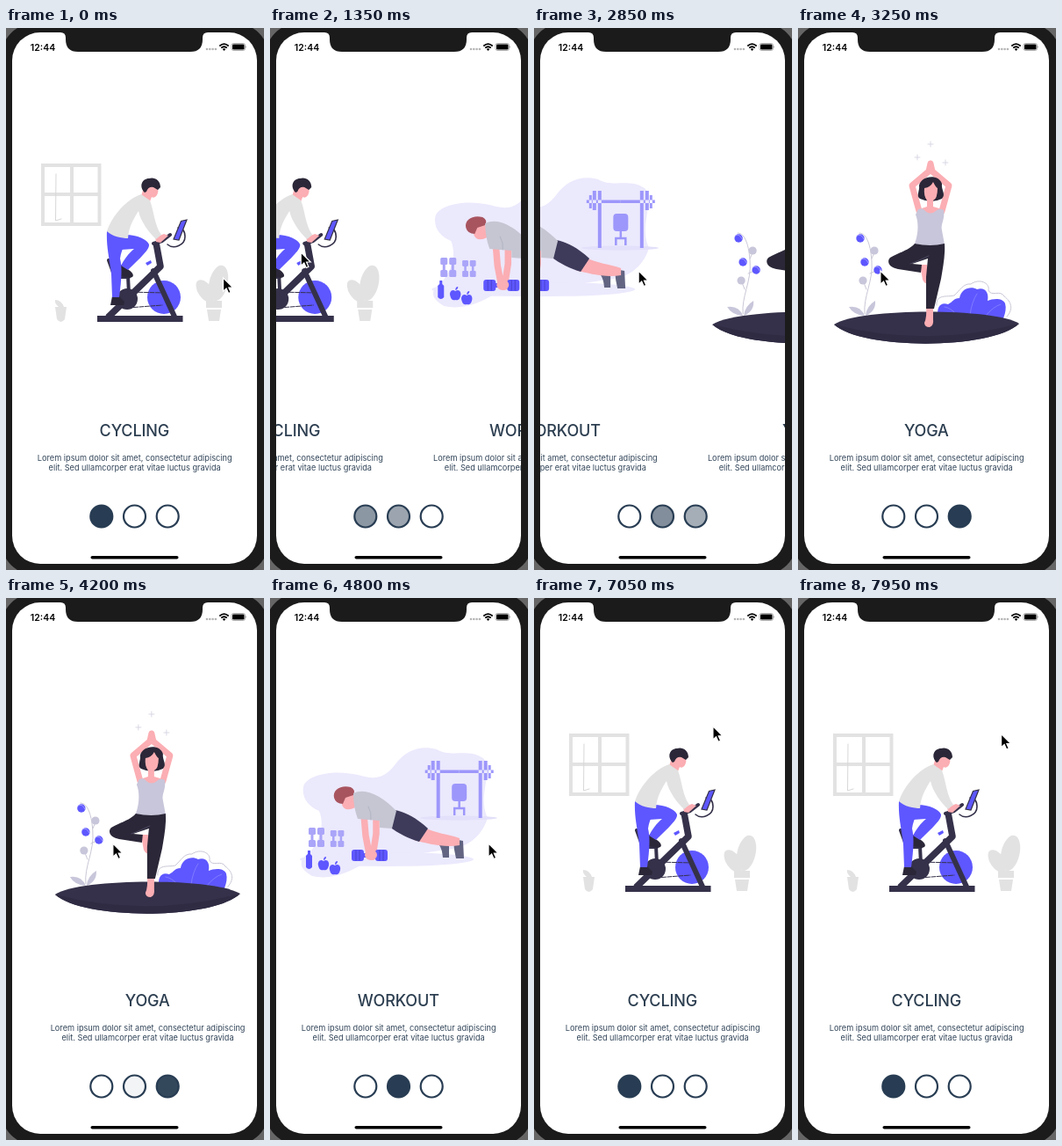
An HTML page that plays this animation: 294x616 px, repeating every 8000 ms.

```html
<!DOCTYPE html>
<html lang="en">
<head>
<meta charset="utf-8">
<title>Fitness onboarding</title>
<style>
  html, body { margin: 0; width: 100%; height: 100%; overflow: hidden; background: #666; }
  svg { display: block; width: 294px; height: 616px; }
  text { font-family: Inter, "Open Sans", sans-serif; fill: #2c3e50; text-anchor: middle; }
  .title { font-size: 18px; font-weight: 500; letter-spacing: -.15px; }
  .body { font-size: 9.2px; fill: #33465a; }
  .clock { font-size: 10.5px; font-weight: 600; fill: #000; }
  .line { fill: none; stroke-linecap: round; stroke-linejoin: round; }
  .gray { fill: #e2e2e2; }
  .dark { fill: #35314a; }
  .ink { fill: #2b2738; }
  .skin { fill: #fbaeb3; }
  .violet { fill: #5e57ff; }
  .lilac { fill: #9d97fb; }
  .pale { fill: #ebe9fc; }
  .mist { fill: #c8c6da; }
</style>
</head>
<body>
<svg viewBox="0 0 294 616">
  <defs>
    <clipPath id="screen"><rect x="7" y="5" width="279" height="604" rx="32"/></clipPath>
    <g id="dumbbell">
      <rect x="1" width="8" height="8" rx="1.5"/>
      <rect x="3.5" y="7" width="3" height="9"/>
      <rect x="1" y="14" width="8" height="8" rx="1.5"/>
    </g>
    <g id="pair"><use href="#dumbbell"/><use href="#dumbbell" x="10"/></g>
    <g id="apple">
      <path d="M0-4C-4-7-7-3-6 1C-5 6-2 7 0 6C2 7 5 6 6 1C7-3 4-7 0-4Z"/>
      <path d="M0-5Q0-9 3-9Q3-6 0-5Z"/>
    </g>
    <path id="rackHalf" d="M0 195.500H-39V199H0ZM-26 185H-22V250H-26ZM-36 190H-33V205H-36ZM-32 185H-28V207H-32Z"/>
    <g id="weight"><rect width="14" height="13" rx="3"/><path class="line" stroke="#4943cc" d="M5 1V12M9 1V12"/></g>
    <path id="sparkle" class="line" stroke="#d5d4e2" stroke-width=".9" d="M-3 0H3M0-3V3"/>
    <g id="berry"><circle r="4.700"/><path class="line" stroke="#b9b5ff" stroke-width=".7" d="M-4-3Q1-6 4 1"/></g>
  </defs>

  <rect x="-6" y="-6" width="306" height="628" rx="40" fill="#1b1b1b"/>
  <rect x="7" y="5" width="279" height="604" rx="32" fill="#fff"/>

  <g clip-path="url(#screen)">
    <g class="page" data-title="CYCLING">
      <path fill="none" stroke="#e2e2e2" stroke-width="4" d="M42 156H106.500V223H42ZM75 156V223M42 189H106"/>
      <path class="line" stroke="#d8d8d8" d="M57 166L56.500 219L63 217"/>
      <g class="gray">
        <path d="M56 317H69L67 331Q62.500 337 58 331ZM56 309Q63 309 66 317H60Q55 313 56 309Z"/>
        <ellipse cx="242" cy="290" rx="10.500" ry="20.500" transform="rotate(13 242 290)"/>
        <ellipse cx="227" cy="299" rx="8" ry="14.500" transform="rotate(-34 227 299)"/>
        <path d="M228 310H246V318H228ZM229 320H245L243 333H231Z"/>
      </g>
      <circle class="violet" cx="180" cy="306" r="19"/>
      <g class="line" stroke="#35314a">
        <path stroke-dasharray="5 1.500" d="M138 300L181 301M139 318L178 315"/>
        <path stroke-width="7.500" stroke-linecap="butt" d="M116 329L176 271L171 244"/>
        <path stroke-width="6" d="M168 276L192 328"/>
        <path stroke-width="4" d="M140 302L139 282M117 264L124 283H140M168 245L178 242L187 235"/>
        <path stroke-width="1.600" d="M184 246C191 252 204 247 204 237C204 230 200 227 196 227"/>
      </g>
      <circle class="dark" cx="138" cy="308" r="12"/>
      <rect class="dark" x="104" y="327" width="97.500" height="7"/>
      <path class="violet" stroke="#35314a" stroke-width="1.200" d="M191 240L199.500 219.500L206 218L197 241Z"/>
      <path class="violet" d="M159 267L165 264L166 267L161 270Z"/>
      <path class="ink" d="M131 269L140 275C147 280 146 284 140 284L122 280L130 277ZM121 305H129L135 311L134 315H119Z"/>
      <path class="violet" d="M115 231C114 250 119 268 120 280L121 306H129C131 290 133 275 130 262C131 254 134 248 140 238Z"/>
      <path class="violet" d="M133 235C148 234 161 240 163 246C164 252 150 264 139 275L131 270C135 262 141 255 146 251L131 252Z"/>
      <path class="skin" d="M157 181L171 180Q175 184 172 190Q169 194 166 192L164 197L154 191ZM170 238L180 234L185 236L176 244L171 243Z"/>
      <path class="gray" d="M154 189C137 195 121 213 115 231C121 237 132 239 139 239C140 225 146 216 151 208C153 219 163 233 171 240L177 235C169 224 169 209 164 196Z"/>
      <path class="ink" d="M158 187C151 180 155 171 163 171C169 169 176 173 176 181L173 184L168 181Q162 180 160 186Z"/>
    </g>

    <g class="page" data-title="WORKOUT">
      <path class="pale" d="M38 215C40 202 70 194 100 201C120 207 130 205 142 190C155 172 172 167 190 172C205 182 228 170 244 183C254 202 236 225 248 250C240 275 220 285 200 286L110 300C90 312 70 321 48 316C30 306 34 297 46 288C58 274 62 256 56 242C45 238 36 228 38 215Z"/>
      <ellipse class="pale" cx="133" cy="297" rx="99" ry="8"/>
      <ellipse fill="#e2e0fa" cx="215" cy="250" rx="44" ry="2.500"/>
      <g class="lilac" transform="translate(215.700 0)">
        <use href="#rackHalf"/><use href="#rackHalf" transform="scale(-1 1)"/>
        <rect x="-8.500" y="211" width="17" height="20" rx="4"/>
        <path fill="none" stroke="#9d97fb" stroke-width="2.500" d="M0 230V239M-5.500 247V239H5.500V247"/>
      </g>
      <g fill="#aaa5f8">
        <use href="#pair" x="43" y="261"/>
        <use href="#pair" transform="translate(68 264) scale(.86)"/>
      </g>
      <g class="violet">
        <path d="M43 287H46V291L48 293V306Q44.500 310 41 306V293L43 291Z"/>
        <use href="#apple" x="61" y="303"/><use href="#apple" x="74" y="308"/>
      </g>
      <path fill="#626482" d="M194 276L204 278V295H197Q196 285 193 281ZM209 274L220 276L221 296H212L210 286Z"/>
      <path class="skin" d="M174 260C190 268 202 268 216 273V281C198 284 179 279 164 275Z"/>
      <path fill="#3d3a5a" d="M142 241C155 243 168 251 180 262L170 277C157 273 147 268 136 260Z"/>
      <path class="skin" d="M82 226L94 222L101 236L95 239Q85 243 82 235Z"/>
      <path fill="#a8545f" d="M73 227C71 217 82 212 92 215Q98 218 95 224L86 227L83 234Q75 234 73 227Z"/>
      <path class="line" stroke="#fbaeb3" stroke-width="7.500" d="M107 246L109 270L113 291M121 244L121 268L117 294"/>
      <path fill="#c5c6d2" d="M95 222C110 215 128 226 144 242L139 262L125 261V253L100 251Q95 238 95 222Z"/>
      <path class="line" stroke="#b4b5c4" d="M112 237Q116 244 115 252"/>
      <g class="violet">
        <use href="#weight" x="93" y="286"/><use href="#weight" x="120" y="286"/>
        <rect x="104" y="290" width="20" height="5"/>
      </g>
      <ellipse class="skin" cx="115" cy="292" rx="7" ry="6"/>
    </g>

    <g class="page" data-title="YOGA">
      <use href="#sparkle" x="151" y="132"/><use href="#sparkle" x="136" y="147"/><use href="#sparkle" x="168" y="153"/>
      <path class="line" stroke="#c9c7d6" d="M76 325C74 305 86 288 84 265C83 249 79 233 70 233M84 262L88 253M82 279L91 275M78 297L74 287M158 315C157 302 170 306 178 304C184 299 188 290 197 291C207 284 219 290 217 298C220 306 231 297 235 305C243 311 246 319 238 328"/>
      <g class="mist">
        <path d="M76 327Q71 315 58 317Q63 326 76 327ZM77 327Q78 316 88 310Q89 322 77 327Z"/>
        <circle cx="87" cy="253" r="4.600"/><circle cx="74" cy="287" r="4.600"/>
      </g>
      <g class="violet">
        <use href="#berry" x="71" y="239"/><use href="#berry" x="76" y="266"/><use href="#berry" x="91" y="275"/>
        <path d="M160 330C157 318 162 311 171 314C177 311 177 307 184 307C186 295 198 293 204 297C213 294 218 301 216 310C222 308 232 306 236 313Q238 320 234 330Z"/>
      </g>
      <path class="line" stroke="#8f8aff" stroke-width=".7" d="M196 326Q198 311 204 302M214 327Q222 317 231 314M180 325Q174 318 167 317"/>
      <path class="dark" d="M41 337C70 318 223 318 252 336C220 366 73 366 41 337Z"/>
      <path fill="#2f2b43" d="M41 337Q146 364 252 336C220 366 73 366 41 337Z"/>
      <path class="line" stroke="#fbaeb3" stroke-width="7" d="M138 208L130 179L149 163L151 154L153 163L172 179L164 208"/>
      <path class="ink" d="M139 194C134 191 139 185 138 179C140 168 160 165 164 177C163 184 169 189 164 194Q152 200 139 194Z"/>
      <path class="skin" d="M144 182Q151 181 154 175Q157 181 159 182Q159 194 154 196V203L164 206L158 211H143L138 206L147 203V196Q143 191 144 182Z"/>
      <path class="mist" d="M137 206Q143 204 145 208Q151 213 157 208Q161 204 166 207C168 217 162 223 164 230L167 246Q150 250 133 245C138 232 137 219 134 212Z"/>
      <path class="skin" d="M139 269H147L149 290Q145 292 142 286ZM146 316H154L154 331Q155 338 150 340Q144 340 144 335Q147 329 146 316Z"/>
      <path class="ink" d="M133 245Q151 249 167 245C168 258 165 273 163 285L155 319H146L146 283Q147 272 148 262L130 268L141 269L140 278L114 274C103 272 101 265 105 261C115 255 126 253 133 245Z"/>
      <path class="line" stroke="#55516a" stroke-width=".8" d="M128 268Q139 264 149 259"/>
    </g>
  </g>

  <g id="dots" stroke="#283d53" stroke-width="2.200" fill="#283d53"></g>
  <rect x="96.500" y="600" width="100" height="3.600" rx="1.800"/>

  <path fill="#1b1b1b" d="M62 4V5Q68 5 68 11V13Q68 27 82 27H210Q224 27 224 13V11Q224 5 230 5V4Z"/>
  <text class="clock" x="42" y="25.500">12:44</text>
  <path class="line" stroke="#b5b5b5" stroke-width="2.600" stroke-dasharray="0 3.300" d="M229 24H239.500"/>
  <path fill="none" stroke="#000" stroke-width="1.700" d="M243.300 20.500Q248.500 15.800 253.700 20.500M245.200 22.700Q248.500 19.800 251.800 22.700"/>
  <path d="M246.700 24Q248.500 22.600 250.300 24L248.500 26Z"/>
  <rect x="257" y="17.500" width="15.500" height="8" rx="2.200" fill="none" stroke="#999" stroke-width=".8"/>
  <rect x="258" y="18.500" width="13.500" height="6" rx="1.300"/>
  <path fill="#999" d="M273.300 20Q275 21.500 273.300 23Z"/>

  <path id="cursor" stroke="#fff" stroke-width="1.200" d="M0 0V15.200L3.600 11.900L6.100 17.500L8.700 16.400L6.300 11H11Z"/>
</svg>

<script>
const LOOP = 8000, PAGE_WIDTH = 279, SWIPE = 700, DRAG_LIMIT = 142;
const NS = "http://www.w3.org/2000/svg";

// The pointer glides to `grab` on a path bent by `bow`, then drags the pages by `turn`.
const gestures = [
  { start: 1019, turn: 1, grab: [164, 255], bow: [-100, -86] },
  { start: 2539, turn: 1, grab: [236, 276], bow: [0, -76] },
  { start: 4103, turn: -1, grab: [107, 279], bow: [-40, 10] },
  { start: 4987, turn: -1, grab: [62, 257], bow: [0, 0] },
  { start: 5900, turn: 0, grab: [190, 98], bow: [0, 0], duration: 0 },
  { start: 7110, turn: 0.45, grab: [207, 142], bow: [-136, 190], duration: 350 },
  { start: 7520, turn: -0.45, grab: [106, 154.5], bow: [0, 0], duration: 380 }
];

const clamp = (value, low, high) => Math.min(high, Math.max(low, value));
const ease = u => { u = clamp(u, 0, 1); return u * u * (3 - 2 * u); };

function stateAt(t) {
  let scroll = 0, point = [247.5, 284], freeSince = 0;
  for (const { start, turn, grab, bow, duration = SWIPE } of gestures) {
    if (t < start) {
      const u = ease((t - freeSince) / (start - freeSince));
      const bend = Math.sin(Math.PI * u);
      point = point.map((from, axis) => from + (grab[axis] - from) * u + bow[axis] * bend);
      break;
    }
    const moved = duration ? turn * PAGE_WIDTH * ease((t - start) / duration) : 0;
    scroll += moved;
    point = [grab[0] - clamp(moved, -DRAG_LIMIT, DRAG_LIMIT), grab[1]];
    freeSince = start + duration;
    if (t < freeSince) break;
  }
  return { scroll, point };
}

function add(parent, tag, attributes, text = "") {
  const node = parent.appendChild(document.createElementNS(NS, tag));
  for (const name in attributes) node.setAttribute(name, attributes[name]);
  node.textContent = text;
  return node;
}

const pages = [...document.querySelectorAll(".page")];
const cursor = document.getElementById("cursor");
const dotGroup = document.getElementById("dots");
for (const page of pages) {
  add(page, "text", { class: "title", x: 146.3, y: 464.3 }, page.dataset.title);
  add(page, "text", { class: "body", x: 146.7, y: 491.5 }, "Lorem ipsum dolor sit amet, consectetur adipiscing");
  add(page, "text", { class: "body", x: 146.7, y: 502.7 }, "elit. Sed ullamcorper erat vitae luctus gravida");
}
const dots = pages.map((_, i) => add(dotGroup, "circle", { cx: 108.8 + i * 37.7, cy: 555, r: 12.5 }));

function draw() {
  const { scroll, point } = stateAt(performance.now() % LOOP);
  pages.forEach((page, i) => {
    const offset = i * PAGE_WIDTH - scroll;
    page.setAttribute("transform", `translate(${offset} 0)`);
    dots[i].setAttribute("fill-opacity", Math.max(0, 1 - Math.abs(offset) / PAGE_WIDTH));
  });
  cursor.setAttribute("transform", `translate(${point})`);
  requestAnimationFrame(draw);
}
draw();
</script>
</body>
</html>
```
